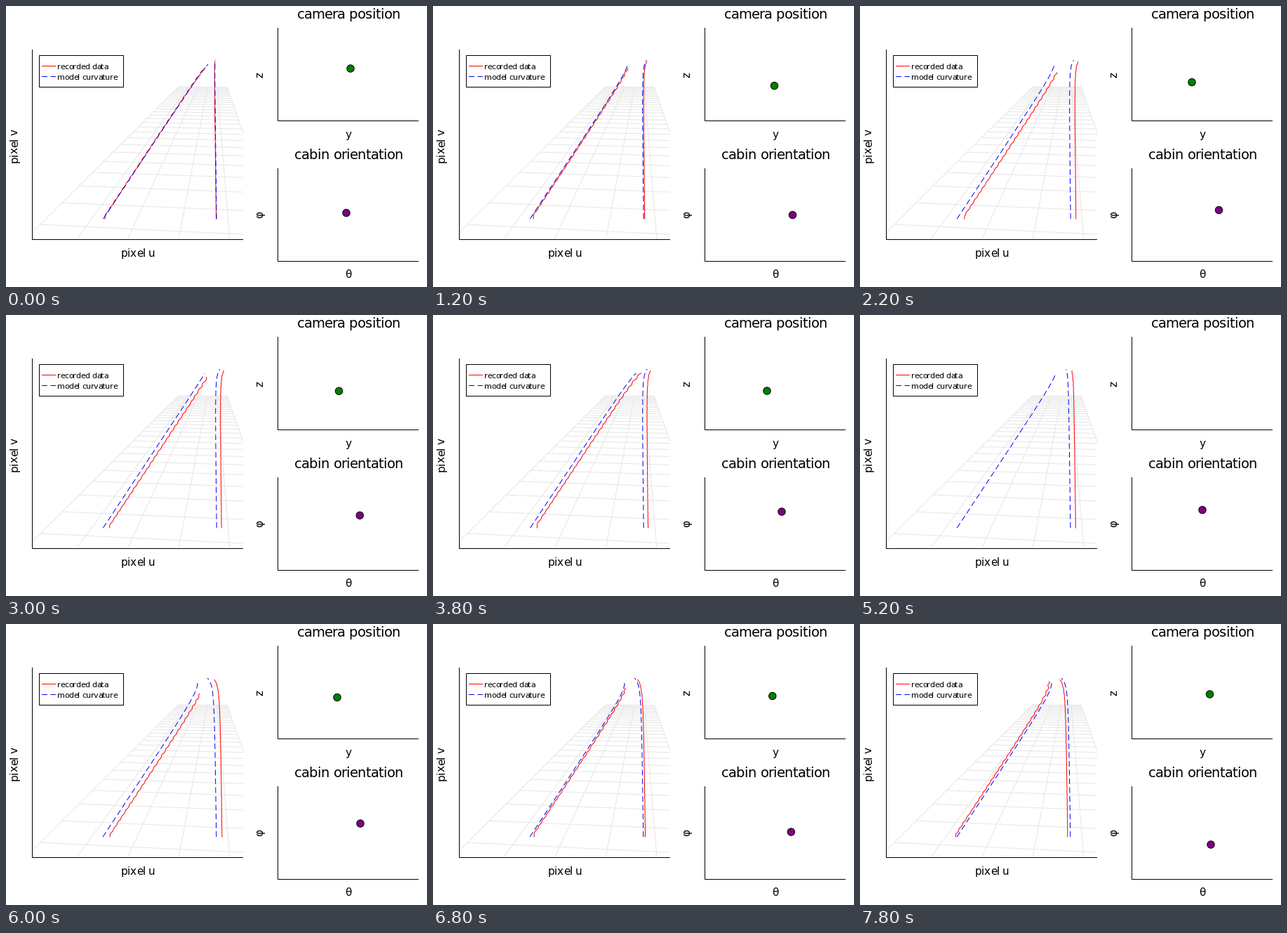
These frames come from a looping animation (600 by 400 pixels, 8000 ms). A matplotlib script:

```python
import math
import numpy as np
import matplotlib.pyplot as plt
from matplotlib.animation import FuncAnimation
from matplotlib.patches import Circle, Rectangle
from matplotlib.textpath import TextPath

W, H, DPI = 600, 400, 100
FRAMES, STEP = 40, 200
PX = 72 / DPI                      # points per pixel
VX, VY = 297, 64                   # vanishing point of the road
SIDE = 5297                        # distance to the lateral vanishing point
DASH = (0, (8, 4.5))

plt.rcParams["font.family"] = "DejaVu Sans"
fig = plt.figure(figsize=(W / DPI, H / DPI), dpi=DPI, facecolor="white")
ax = fig.add_axes([0, 0, 1, 1])
ax.set_xlim(0, W)
ax.set_ylim(H, 0)
ax.axis("off")


def line(xs, ys, color, ls="-", z=3):
    return ax.plot(xs, ys, color=color, ls=ls, lw=PX, zorder=z, snap=False,
                   solid_capstyle="butt", solid_joinstyle="miter",
                   dash_capstyle="butt")[0]


def advance(char, size):
    def width(s):
        return TextPath((0, 0), s, size=size).get_extents().width
    return math.floor(width(f"|{char}|") - width("||"))


def label(x, y, text, pt, rot=0, centered=True):
    """Set text letter by letter on whole-pixel advances."""
    steps = [advance(c, pt / PX) for c in text]
    pos = -sum(steps) / 2 if centered else 0
    for char, step in zip(text, steps):
        at = (x, y - pos) if rot else (x + pos, y)
        ax.text(*at, char, fontsize=pt, rotation=rot, ha="left",
                va="baseline", rotation_mode="anchor", zorder=6)
        pos += step


def frame_axes(left, top, right, bottom):
    line([left, left, right], [top, bottom, bottom], "black", z=5)


def dot(color):
    return ax.add_patch(Circle((0, 0), 5.2, fc=color, ec="black",
                               lw=PX, zorder=6))


# Perspective road grid, clipped to the main plot
road = Rectangle((38, 62), 300, 270.5, fc="none", ec="none")
ax.add_patch(road)
slopes = np.linspace(-1.004, 0.353, 6)


def on_row(tilt, slope):
    dy = SIDE * tilt / (1 - slope * tilt)
    return VX + slope * dy, VY + dy


def row_tilt(depth):
    dy = 1729 / depth
    return dy / (SIDE + slopes[0] * dy)


def grid_line(p, q):
    line(*zip(p, q), "#e6e6e6", z=1).set_clip_path(road)


for depth in range(7, 35):
    t = row_tilt(depth)
    grid_line(on_row(t, slopes[0]), on_row(t, slopes[-1]))
for s in slopes:
    grid_line(on_row(row_tilt(34), s), on_row(row_tilt(5.5), s))

frame_axes(37.5, 62, 338, 332.5)
frame_axes(387.5, 31, 588, 163.5)
frame_axes(387.5, 231, 588, 363.5)

label(488, 18, "camera position", 14)
label(488, 218, "cabin orientation", 14)
label(188, 357, "pixel u", 11)
label(17, 199, "pixel v", 11, 90)
label(488, 188, "y", 11)
label(366, 97.5, "z", 11, 90)
label(488, 387, "θ", 11)
label(366, 297.5, "φ", 11, 90)

ax.add_patch(Rectangle((47.5, 70.5), 120, 45, fc="white", ec="black",
                       lw=PX, zorder=4, snap=False))
line([51, 71], [85.5, 85.5], "red", z=5)
line([51, 71], [100.5, 100.5], "blue", DASH, z=5)
label(73, 90, "recorded data", 8, centered=False)
label(73, 105, "model curvature", 8, centered=False)

# Key points: frame index, then the values to blend between
CAMERA = [(0, 491, 89), (6, 486.5, 113.5), (11, 473, 108.5),
          (19, 476, 108), (30, 472, 104.5), (39, 498.5, 100)]
CABIN = [(0, 485, 294.5), (6, 512.5, 297.5), (11, 511.5, 290.5),
         (19, 497, 280), (26, 488, 277.5), (30, 505, 284),
         (36, 513, 302), (39, 500, 314)]
BEND_LEFT = [(0, 3.5), (6, -7), (11, -7.5), (19, 5), (30, -11.5)]
BEND_RIGHT = [(0, 1), (6, 7), (19, 8), (30, -10)]
LOST = range(25, 28)               # left lane not detected


def blend(i, keys):
    at, *cols = zip(*keys)
    return [np.interp(i, at, col) for col in cols]


def lane_x(y, near, bend, top):
    """Straight lane to the vanishing point, bending off towards its top."""
    dy = y - VY
    return VX + (near - VX) / 239 * dy + bend * ((top - VY) / dy) ** 1.3


def model_lane(near, bend, top):
    y = np.linspace(303, top, 80)
    return lane_x(y, near, bend, top), y


def data_lane(near, bend, top, shift, end, rough, rng):
    y = np.linspace(299, end, 110)
    phase = rng.uniform(0, 6) + np.cumsum(rng.normal(0, 0.15, y.size))
    size = rough * (0.75 + 20 / (y - VY))
    x = lane_x(y, near, bend, top) + shift + size * np.sin(0.72 * y + phase)
    return np.r_[x[0], x], np.r_[303.5, y]


red_l, red_r = line([], [], "red"), line([], [], "red")
blue_l, blue_r = line([], [], "blue", DASH), line([], [], "blue", DASH)
camera, cabin = dot("green"), dot("purple")


def draw(i):
    rng = np.random.default_rng(100 + i)
    camera.center = blend(i, CAMERA)
    cabin.center = blend(i, CABIN)
    left = 138.5, blend(i, BEND_LEFT)[0], 83
    right = 300, blend(i, BEND_RIGHT)[0], 77
    # A sideways camera shifts the recording and hides part of a bend
    shift = 0.45 * (490 - camera.center[0])
    end = 87 - 0.13 * left[1] * shift
    blue_l.set_data(*model_lane(*left))
    blue_r.set_data(*model_lane(*right))
    red_l.set_data(*data_lane(*left, shift, end, 0.8, rng))
    red_r.set_data(*data_lane(*right, shift, 79, 0.15, rng))
    for part in (red_l, camera):
        part.set_visible(i not in LOST)
    return red_l, red_r, blue_l, blue_r, camera, cabin


anim = FuncAnimation(fig, draw, frames=FRAMES, interval=STEP,
                     repeat=True, repeat_delay=0, blit=False)
plt.show()
```
